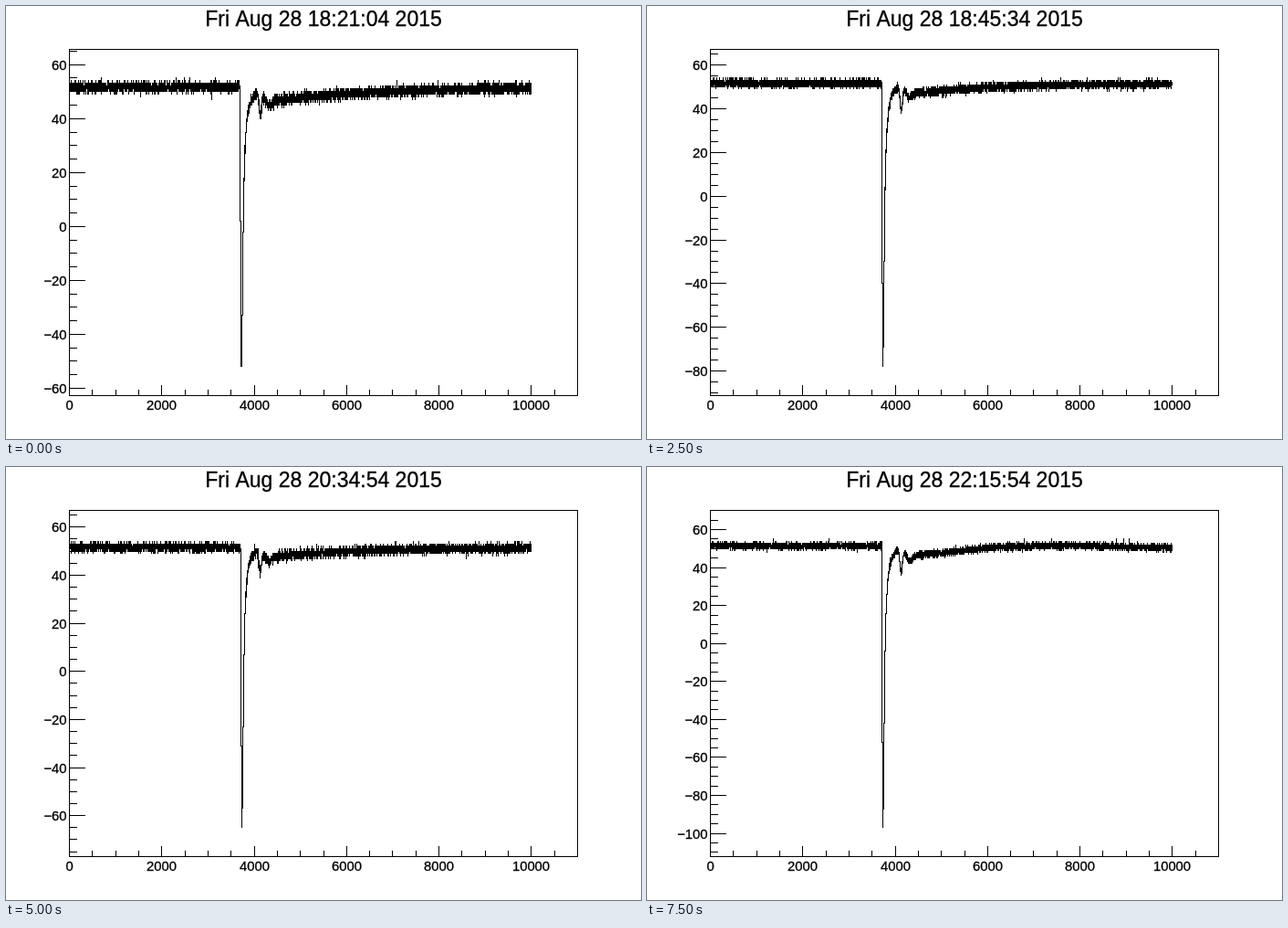
These frames come from a looping animation (696 by 474 pixels, 8000 ms). An HTML page with a canvas:

```html
<!DOCTYPE html>
<html lang="en">
<head>
<meta charset="utf-8">
<title>Pulse recordings</title>
<style>
  html, body { margin: 0; width: 100%; height: 100%; overflow: hidden; background: #fff; }
  canvas { display: block; }
</style>
</head>
<body>
<canvas id="stage" width="696" height="474"></canvas>
<script>
const ctx = document.getElementById('stage').getContext('2d');
const LOOP = 8000, HOLD = 1250;
const LEFT = 69, RIGHT = 626, TOP = 47, BOTTOM = 426;
const X_SCALE = (RIGHT - LEFT) / 11000, SAMPLES = 10000;
const BASE = 51.6, NOISE = 0.95;

// onset: x where the drop starts; sag: slow recovery deficit; swell: late wave
const shots = [
  { time: '18:21:04', min: -52, max: 55, onset: 256, sag: 5.5, swell: 0 },
  { time: '18:21:54', min: -104, max: 55, onset: 257, sag: 7, swell: 0 },
  { time: '18:45:34', min: -78, max: 54, onset: 257, sag: 5, swell: 0 },
  { time: '19:19:24', min: -51, max: 55, onset: 256, sag: 3, swell: 0 },
  { time: '20:34:54', min: -65, max: 55, onset: 257, sag: 4.2, swell: 0 },
  { time: '21:29:24', min: -96, max: 56, onset: 257, sag: 6, swell: 1.8 },
  { time: '22:15:54', min: -97, max: 55, onset: 257, sag: 6, swell: 1 }
];

const bell = (x, center, width) => Math.exp(-(((x - center) / width) ** 2));

function randomFrom(seed) {
  return () => {
    seed = (seed * 1664525 + 1013904223) >>> 0;
    return (seed + 1) / 4294967297;
  };
}

// The vertical axis leaves a tenth of the data range free above and below
function valueToY({ min, max }) {
  const range = max - min;
  const scale = (BOTTOM - TOP) / (1.2 * range);
  const zero = TOP + 0.4 + (max + 0.1 * range) * scale;
  return v => Math.floor(zero - v * scale);
}

function signal(x, { min, onset, sag, swell }) {
  const depth = BASE - min;
  const crest = 258 + 0.4 * (onset - 256);
  if (x < onset) return BASE;
  if (x < crest) return BASE - depth * (x - onset) / (crest - onset);

  const t = x - crest;
  const pulse = depth * bell(t, 0, 10) / (1 + (t / 2) ** 2);
  const slow = sag * Math.min(1, t / 4) * Math.exp(-Math.max(0, x - 285) * depth / 12000);
  const rebound = 0.7 * sag * bell(x, 277, 8);
  const echoes = depth * (0.08 * bell(x, 278.6, 2) + 0.02 * bell(x, 288, 4));
  const wave = x > 330 ? swell * Math.sin(2 * Math.PI * (x - 330) / 360) : 0;
  return BASE - pulse - slow + rebound - echoes + wave;
}

const bar = (x0, y0, x1, y1) => ctx.fillRect(x0, y0, x1 - x0 + 1, y1 - y0 + 1);

function label(text, x, y, size, align) {
  ctx.font = `${size}px "Liberation Sans", Arial, sans-serif`;
  ctx.textAlign = align;
  ctx.lineWidth = 0.3;
  ctx.fillText(text, x, y);
  ctx.strokeText(text, x, y);
}

function drawAxes(toY) {
  bar(LEFT, TOP, RIGHT, TOP);
  bar(LEFT, BOTTOM, RIGHT, BOTTOM);
  bar(LEFT, TOP, LEFT, BOTTOM);
  bar(RIGHT, TOP, RIGHT, BOTTOM);

  for (let v = 0; v <= 11000; v += 500) {
    const x = Math.round(LEFT + v * X_SCALE);
    const major = v % 2000 === 0;
    bar(x, major ? 415 : 420, x, BOTTOM);
    if (major) label(String(v), x + 0.5, 442, 14.8, 'center');
  }
  for (let v = -120; v <= 80; v += 5) {
    const y = toY(v);
    if (y < TOP || y > BOTTOM) continue;
    const major = v % 20 === 0;
    bar(LEFT, y, major ? 86 : 77, y);
    if (major) label((v < 0 ? '\u2212' : '') + Math.abs(v), 66.5, y + 5.8, 14.8, 'right');
  }
}

function drawTrace(shot, toY, seed) {
  const random = randomFrom(seed);
  const noise = () => NOISE * Math.sqrt(-2 * Math.log(random())) * Math.cos(2 * Math.PI * random());

  let column = LEFT, last = Math.round(BASE), low = last, high = last;
  for (let i = 0; i < SAMPLES; i++) {
    const x = LEFT + i * X_SCALE;
    const value = Math.round(signal(x, shot) + noise());
    if (Math.floor(x) > column) {
      bar(column, toY(high), column, toY(low));
      column = Math.floor(x);
      low = high = last;
    }
    last = Math.min(shot.max, Math.max(shot.min, value));
    low = Math.min(low, last);
    high = Math.max(high, last);
  }
  bar(column, toY(high), column, toY(low));
}

function draw(index) {
  const shot = shots[index];
  const toY = valueToY(shot);
  ctx.fillStyle = '#fff';
  ctx.fillRect(0, 0, 696, 474);
  ctx.fillStyle = ctx.strokeStyle = '#000';
  label(`Fri Aug 28 ${shot.time} 2015`, 348, 22, 23, 'center');
  drawAxes(toY);
  drawTrace(shot, toY, 977 * (index + 1));
}

let shown = -1;
const start = performance.now();

function tick() {
  const index = Math.floor(((performance.now() - start) % LOOP) / HOLD);
  if (index !== shown) draw(shown = index);
  requestAnimationFrame(tick);
}
tick();
</script>
</body>
</html>
```
